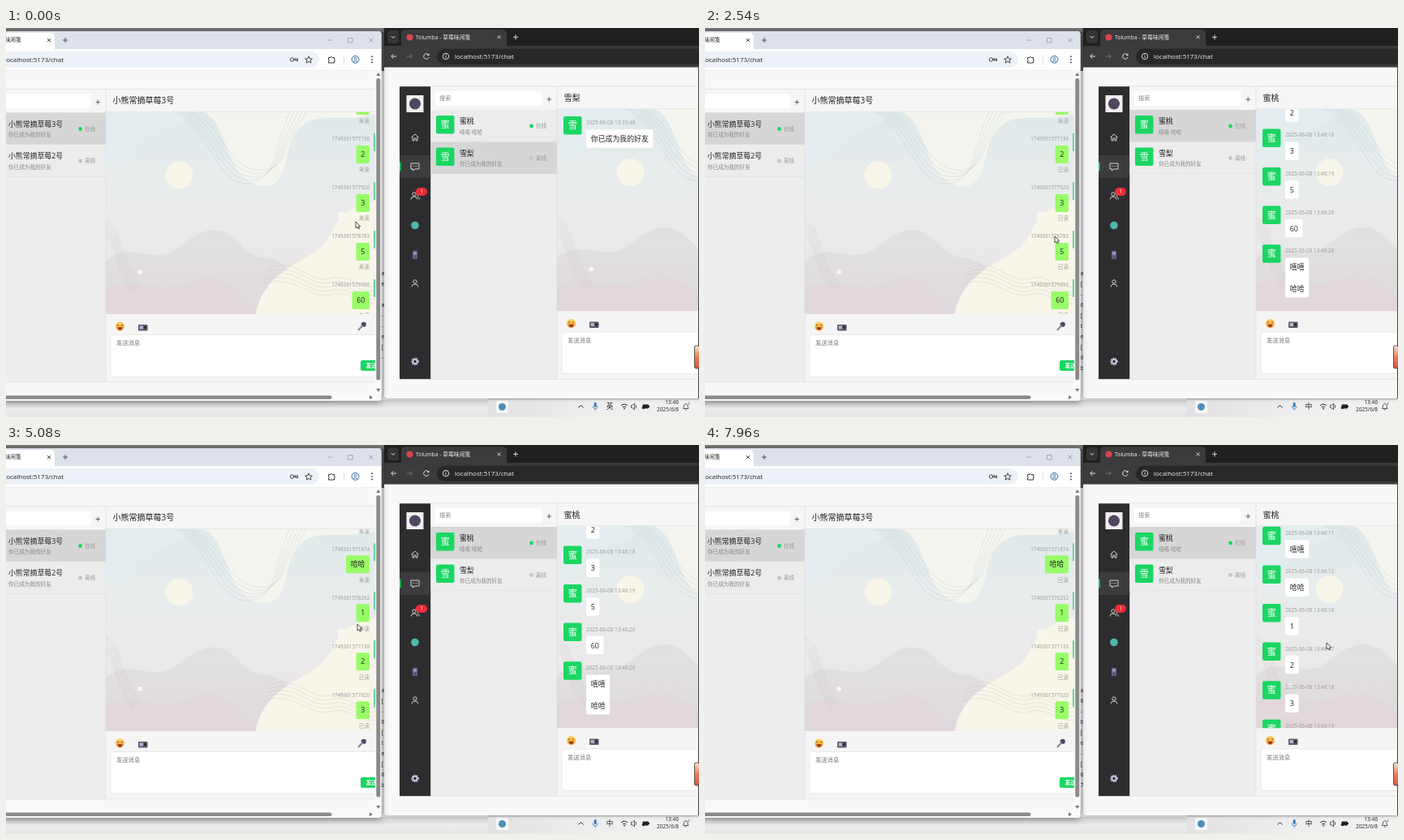
Recreate the animation shown at these times as an HTML page with a canvas. Size 854 px wide and 480 px high, loop 8 s.

```html
<!DOCTYPE html>
<html lang="zh">
<head>
<meta charset="utf-8">
<title>Chat</title>
<style>
html, body { margin: 0; width: 100%; height: 100%; overflow: hidden; background: #fff; }
canvas { display: block; width: 100vw; height: 100vh; }
</style>
</head>
<body>
<canvas id="stage"></canvas>
<script>
const W = 854, H = 480, LOOP = 8000;
const CLICK = 1480, NOTCH = 55.6;
const FONT = '"Open Sans", "Noto Sans CJK SC", "Noto Sans CJK", sans-serif';
const GREEN = '#1bd663', GRAY = '#999';
const canvas = document.getElementById('stage');
const c = canvas.getContext('2d');
const dpr = window.devicePixelRatio || 1;
canvas.width = W * dpr;
canvas.height = H * dpr;

// ---------- drawing helpers ----------
function rect(x, y, w, h, fill, r = 0, stroke) {
  c.beginPath();
  r ? c.roundRect(x, y, w, h, r) : c.rect(x, y, w, h);
  if (fill) { c.fillStyle = fill; c.fill(); }
  if (stroke) { c.strokeStyle = stroke; c.lineWidth = 0.8; c.stroke(); }
}
function disc(x, y, r, fill, stroke, width = 1) {
  c.beginPath();
  c.arc(x, y, r, 0, 7);
  if (fill) { c.fillStyle = fill; c.fill(); }
  if (stroke) { c.strokeStyle = stroke; c.lineWidth = width; c.stroke(); }
}
function path(d, fill, stroke, width = 1) {
  const p = new Path2D(d);
  if (fill) { c.fillStyle = fill; c.fill(p); }
  if (stroke) { c.strokeStyle = stroke; c.lineWidth = width; c.stroke(p); }
}
function text(s, x, y, size, color = '#222', align = 'left', weight = 400) {
  c.font = `${weight} ${size}px ${FONT}`;
  c.fillStyle = color;
  c.textAlign = align;
  c.fillText(s, x, y + size * 0.37);
}
function textWidth(s, size) {
  c.font = `400 ${size}px ${FONT}`;
  return c.measureText(s).width;
}
function fade(x0, y0, x1, y1, ...colors) {
  const g = c.createLinearGradient(x0, y0, x1, y1);
  colors.forEach((k, i) => g.addColorStop(i / (colors.length - 1), k));
  return g;
}
function at(x, y, draw) {
  c.save();
  c.translate(x, y);
  draw();
  c.restore();
}
function clipped(x, y, w, h, draw) {
  c.save();
  c.beginPath();
  c.rect(x, y, w, h);
  c.clip();
  draw();
  c.restore();
}

// ---------- motion ----------
const ease = p => p * p * (3 - 2 * p);
const ramp = (t, from, span) => ease(Math.min(1, Math.max(0, (t - from) / span)));
const scroll = (t, starts) => starts.reduce((sum, s) => sum + NOTCH * ramp(t, s, 170), 0);
const leftScroll = t => scroll(t, [3450, 4600]);
const rightScroll = t => scroll(t, [6693, 7180, 7600]);

// time, x, y, shape on arrival
const track = [
  [0, 431, 239, 'arrow'], [350, 431, 239, 'arrow'], [1000, 531, 164, 'hand'],
  [1350, 562, 127, 'hand'], [1700, 562, 127, 'hand'], [2350, 431, 257, 'beam'],
  [2750, 431, 257, 'beam'], [3250, 329, 233, 'arrow'], [4400, 329, 233, 'arrow'],
  [4950, 433, 221, 'arrow'], [5950, 433, 221, 'arrow'], [6550, 767, 244, 'arrow'],
  [7400, 767, 244, 'arrow'], [7800, 766, 244, 'arrow'], [LOOP, 766, 244, 'arrow']
];
function pointer(t) {
  const i = Math.max(1, track.findIndex(k => k[0] > t));
  const a = track[i - 1], b = track[i];
  const p = ramp(t, a[0], b[0] - a[0]);
  const x = a[1] + (b[1] - a[1]) * p, y = a[2] + (b[2] - a[2]) * p;
  let shape = p < 0.9 ? a[3] : b[3];
  if (shape === 'hand' && x < 523 || shape === 'beam' && p > 0 && p < 0.9) shape = 'arrow';
  if (x > 523 && x < 678) shape = 'hand';
  return { x, y, shape };
}
function drawPointer(t) {
  const { x, y, shape } = pointer(t);
  at(x, y, () => {
    if (shape === 'arrow') {
      path('M0 0V8L1.9 6.4L3.2 9L4.5 8.4L3.3 5.9H5.8Z', '#fff', '#222', 0.8);
    } else if (shape === 'hand') {
      path('M-.8 .2Q0-1 .9 .2V3.6L3.8 4.4Q4.8 4.8 4.6 6L4 9H-.8L-3 5.8Q-2.6 4.6-.8 5.8Z', '#fff', '#222', 0.8);
    } else {
      path('M-1.5-4H1.5M0-4V4M-1.5 4H1.5', null, '#333', 0.9);
    }
  });
}

// ---------- data ----------
const me = '小熊常摘草莓';
const contactsA = [
  { name: me + '3号', sub: '你已成为我的好友', on: true },
  { name: me + '2号', sub: '你已成为我的好友' }
];
const contactsB = [
  { name: '蜜桃', sub: '嘻嘻 哈哈', on: true },
  { name: '雪梨', sub: '你已成为我的好友' }
];
const sent = [
  ['1749361570961', '嘻嘻', '11'], ['1749361571874', '哈哈', '12'],
  ['1749361576292', '1', '16'], ['1749361577136', '2', '17'],
  ['1749361577920', '3', '18'], ['1749361578783', '5', '19'],
  ['1749361579996', '60', '20']
];

// ---------- chat wallpaper ----------
function wallpaper() {
  rect(123, 103.5, 340, 250, fade(0, 103, 0, 353, '#dfe9ea', '#e8ecec', '#ebe9e9', '#e5dfe2'));
  path('M123 103H232C210 128 180 126 160 150C148 164 136 166 123 170Z', '#e3edef');
  path('M123 288C150 262 176 290 204 276C226 262 238 246 262 250C286 254 290 282 322 284C352 288 368 318 372 353H123Z', 'rgba(211,208,211,.38)');
  path('M123 320C160 306 196 330 228 312C262 294 286 322 310 353H123Z', 'rgba(226,211,217,.45)');
  path('M240 103C262 108 268 140 279 164C290 192 325 207 338 184C350 162 344 132 370 117C392 104 420 118 462 104Z', '#f5f5ef');
  path('M308 353C312 326 330 306 356 291C386 274 394 268 402 250C412 228 432 216 462 212V353Z', '#f8f5e9');
  for (let i = 0; i < 5; i++) {
    const d = i * 5;
    path(`M${205 + d} 103C${236 + d} 112 ${248 + d} 152 ${268 + d} ${176 - d / 2}C${288 + d} ${202 - d} ${322 + d / 2} ${196 - d} ${331 + d / 2} 160C${336 + d / 2} 136 ${344 + d} 118 ${350 + d} 103`,
      null, 'rgba(160,178,190,.42)', 0.6);
    path(`M123 ${238 + d}C${144 - d / 3} ${246 + d} ${138 - d / 3} ${282 + d / 2} ${166 - d / 2} ${318 + d / 3}`,
      null, 'rgba(170,165,175,.4)', 0.6);
    path(`M${326 - d / 2} ${296 + d}C${356} ${282 + d} ${374} ${316 + d} ${400} ${309 + d}C${425} ${302 + d} ${435} ${326 + d} 460 ${318 + d}`,
      null, 'rgba(180,175,175,.4)', 0.6);
  }
  disc(213.5, 181.5, 17, '#f8f5e9');
  disc(414.5, 232.5, 6, '#faf7ee');
  disc(165, 301, 3, '#faf6f2');
}

// ---------- messages ----------
function avatar(ch, x, y) {
  rect(x, y, 22.5, 22.5, GREEN, 2);
  text(ch, x + 11.2, y + 11.2, 11, '#fff', 'center');
}
function outgoing(t) {
  const shift = leftScroll(t);
  sent.forEach(([stamp, body], i) => {
    const y = 137 + (i - 3) * 60 + shift;
    if (y < 50 || y > 370) return;
    const w = textWidth(body, 8.8) + 11.4;
    text(stamp, 448, y, 6.3, GRAY, 'right');
    rect(448 - w, y + 8, w, 22, '#98fb68', 2);
    text(body, 448 - w / 2, y + 19, 8.8, '#222', 'center');
    const seen = i > 0 && t > CLICK + 60 && 108 + (i - 3) * 47.6 + rightScroll(t - 60) > 102;
    text(seen ? '已读' : '未读', 448, y + 38, 6.6, GRAY, 'right');
    rect(453, y - 7, 2, 22, '#62d99a');
  });
}
function incoming(ch, stamp, y, lines) {
  const w = Math.max(...lines.map(s => textWidth(s, 8.9))) + 11.4;
  avatar(ch, 131, y - 7.7);
  text(stamp, 159, y, 6.4, GRAY);
  rect(159, y + 8.5, w, 22.5 + (lines.length - 1) * 26.5, '#fff', 2);
  lines.forEach((s, i) => text(s, 164.8, y + 20 + i * 26.5, 8.9));
}
function inbox(t) {
  if (t < CLICK) {
    incoming('雪', '2025-06-08 13:39:46', 120.3, ['你已成为我的好友']);
    return;
  }
  const shift = rightScroll(t);
  sent.forEach(([, body, sec], i) =>
    incoming('蜜', '2025-06-08 13:46:' + sec, 135.6 + (i - 4) * 47.6 + shift, [body]));
  incoming('蜜', '2025-06-08 13:46:26', 278.4 + shift, ['嘻嘻', '哈哈']);
}

// ---------- chat application, shared by both windows ----------
function sidebar() {
  rect(-71, 75.5, 38.5, 361.5, '#2d2d2f');
  rect(-62.5, 86.5, 21, 21, '#f1eef2');
  disc(-52, 97, 7, '#514760');
  rect(-71, 160.5, 38.5, 28, '#3c3c3e');
  rect(-71, 169, 1.6, 11, GREEN);
  const ink = '#e0e0e0';
  at(-52, 138.5, () => path('M-4.5 0L0-4L4.5 0M-3-1V4H-1V1H1V4H3V-1', null, ink, 0.9));
  at(-52, 174.5, () => {
    path('M-5-4H5V3H0L-2.5 5V3H-5Z', null, ink, 0.9);
    [-2.3, 0, 2.3].forEach(x => disc(x, -0.5, 0.6, ink));
  });
  const person = (x, y) => at(x, y, () => {
    disc(0, -2, 2.2, null, ink, 0.9);
    path('M-4 4.5Q-3.6 1 0 1T4 4.5', null, ink, 0.9);
  });
  person(-53, 210.5);
  path('M-50 206Q-47 208-49 211Q-47 212-46.5 215', null, ink, 0.9);
  rect(-51, 200.5, 14, 10, '#ef2d35', 5);
  text('1', -44, 205.5, 6.5, '#fff', 'center');
  disc(-52, 247, 4.8, '#4fb8ad');
  rect(-55, 278.5, 6, 10, '#71608e', 1);
  rect(-53.7, 280, 3.4, 3, '#a69abd');
  [284.5, 286.5].forEach(y => rect(-53.5, y, 3, 0.8, '#3d3350'));
  person(-52, 318.5);
  c.setLineDash([1.6, 1.25]);
  disc(-52, 415, 4, null, '#d4c6e5', 1.6);
  c.setLineDash([]);
  disc(-52, 415, 2.6, null, '#d4c6e5', 1.7);
}
function contactList(contacts, selected) {
  rect(-32.5, 75.5, 155.5, 361.5, '#ededed');
  rect(-32.5, 75.5, 155.5, 29, '#f6f6f6');
  rect(-27, 81.5, 131.5, 18, '#fff', 2);
  text('搜索', -22, 90, 7.3, '#888');
  path('M110.5 91.5H116M113.2 88.7V94.3', null, '#444', 0.8);
  contacts.forEach((p, i) => {
    const y = 104.5 + i * 39.5;
    rect(-32.5, y, 155.5, 39.5, i === selected ? '#d6d6d6' : '#ececec');
    rect(-32.5, y + 39, 155.5, 0.6, '#dcdcdc');
    avatar(p.name[0], -26, y + 7);
    text(p.name, 3, y + 14, 8.9);
    text(p.sub, 3, y + 27.5, 6.6, '#888');
    disc(91.5, y + 20, 2.4, p.on ? GREEN : '#c4c4c4');
    text(p.on ? '在线' : '离线', 97, y + 20, 6.6, GRAY);
  });
}
function composer() {
  rect(123, 353, 340, 84, '#f5f5f5');
  disc(140.5, 368, 5.5, fade(0, 362, 0, 374, '#ffd65a', '#f49a38'));
  path('M137 367Q138 365.5 139 367M142 367Q143 365.5 144 367', null, '#6b3b19', 0.9);
  path('M137.4 369.2H143.6Q142.6 372.6 140.5 372.6T137.4 369.2Z', '#8f3424');
  rect(163, 366, 11.5, 7.5, '#5c566c', 1);
  rect(164.5, 367.5, 4.5, 4, '#b7b1c5');
  disc(171.5, 369.5, 1.8, '#2f2a3a');
  path('M434 373L439 367.5', null, '#8a8494', 2);
  disc(440.8, 365.8, 3.1, '#524565');
  path('M437.5 366L440.5 369', null, '#bdb4cc', 1);
  rect(129, 378.5, 340, 51.5, '#fff', 3, '#e6e6e6');
  text('发送消息', 136, 388.5, 7.3, '#777');
  rect(437, 410, 30, 13, GREEN, 2.5);
  text('发送', 443.5, 416.5, 6.8, '#fff', 'left', 700);
}
function chatApp(contacts, selected, drawMessages) {
  sidebar();
  contactList(contacts, selected);
  rect(123, 75.5, 340, 28, '#f6f6f6');
  text(contacts[selected].name, 131.5, 89.5, 10);
  clipped(123, 103.5, 340, 249.5, () => {
    wallpaper();
    drawMessages();
  });
  composer();
  rect(122.6, 75.5, 0.7, 361.5, '#dcdcdc');
  rect(-71, 75, 540, 0.7, '#e0e0e0');
  rect(-71, 436.5, 540, 0.7, '#e2e2e2');
  rect(123, 103, 340, 0.6, '#dedede');
}

// ---------- windows ----------
const cross = (x, y, r, color) =>
  path(`M${x - r} ${y - r}L${x + r} ${y + r}M${x + r} ${y - r}L${x - r} ${y + r}`, null, color, 0.9);
const plus = (x, y, color) =>
  path(`M${x - 3} ${y}H${x + 3}M${x} ${y - 3}V${y + 3}`, null, color, 0.9);

function leftWindow(t) {
  c.save();
  c.shadowColor = 'rgba(0,0,0,.4)';
  c.shadowBlur = 8 * dpr;
  c.shadowOffsetY = 2 * dpr;
  rect(-10, 4, 472.5, 456, '#f8f8f8', 4);
  c.restore();
  rect(-10, 4, 472.5, 26, '#dde1ea', [4, 4, 0, 0]);
  rect(-20, 6, 80, 24, '#fff', [5, 5, 0, 0]);
  text('味闲笺', 18.5, 15, 6.6, '#222', 'right');
  cross(53, 15, 2, '#333');
  plus(73, 15, '#444');
  path('M396.5 15H402M421.5 12.5H427V18H421.5Z', null, '#999', 0.8);
  cross(450, 15, 2.6, '#999');
  rect(0, 26, 462.5, 26, '#fff');
  rect(-20, 29, 406, 19.5, '#edf1f8', 10);
  text('localhost:5173/chat', 71, 38.7, 8, '#222', 'right');
  disc(352.5, 39, 2.2, null, '#444', 1);
  path('M354.7 38H359.5V40.5H358V39.5H355', null, '#444', 1);
  path('M373 34.8L374.3 37.8L377.4 38L375 40L375.8 43.1L373 41.4L370.2 43.1L371 40L368.6 38L371.7 37.8Z', null, '#333', 0.9);
  path('M397.5 36.5H400Q400.5 34 402 36.5H404.5V39Q406.5 40 404.5 41V43H397.5V41Q399.5 40 397.5 39Z', null, '#333', 1);
  rect(416, 34, 0.8, 10, '#d5dcea');
  disc(430.5, 38.8, 4.4, null, '#2d629f', 1);
  disc(430.5, 37.6, 1.4, null, '#2d629f', 0.9);
  path('M427.7 41.5Q430.5 39.2 433.3 41.5', null, '#2d629f', 0.9);
  [35.2, 38.8, 42.4].forEach(y => disc(451, y, 0.9, '#333'));
  rect(0, 52, 462.5, 0.6, '#e6e6e6');
  clipped(0, 52.6, 455, 399, () => chatApp(contactsA, 0, () => outgoing(t)));
  rect(455, 52.6, 7.5, 399, '#fafafa');
  rect(456.3, 62, 5, 372.5, '#8a8a8a', 2.5);
  path('M456.3 59L458.8 55L461.3 59ZM456.3 445L458.8 449L461.3 445Z', '#777');
  rect(0, 451.5, 462, 8, '#fafafa');
  rect(-5, 453.5, 406.5, 4.6, '#8a8a8a', 2.3);
  path('M448 453.3L452 455.8L448 458.3Z', '#777');
}

function rightWindow(t) {
  c.save();
  c.shadowColor = 'rgba(0,0,0,.35)';
  c.shadowBlur = 5 * dpr;
  rect(466, -5, 400, 462, '#f8f8f8', 4);
  c.restore();
  rect(466, 0, 388, 24, '#202020');
  rect(470, 3, 14, 16, '#353535', 4);
  path('M474.8 10L477 12.3L479.2 10', null, '#ddd', 1);
  rect(487, 2, 130, 24, '#3b3b3b', [5, 5, 0, 0]);
  disc(497.5, 11.5, 4, '#d9444f');
  text('Tolumba - 草莓味闲笺', 505, 11.3, 6.8, '#f0f0f0');
  cross(607.5, 11.3, 2, '#eee');
  plus(628, 11.3, '#eee');
  rect(466, 22, 388, 26.5, '#3b3b3b');
  rect(531, 25.5, 340, 19.5, '#282828', 10);
  path('M481 35H475M477.5 32.2L474.7 35L477.5 37.8', null, '#e4e4e4', 1);
  path('M494 35H500M497.7 32.2L500.5 35L497.7 37.8', null, '#777', 1);
  c.beginPath();
  c.arc(518, 35, 3.2, 0.3, 5.6);
  c.strokeStyle = '#e4e4e4';
  c.lineWidth = 1;
  c.stroke();
  path('M521.5 31.2V34H518.8Z', '#e4e4e4');
  disc(542, 35, 3.7, null, '#eee', 0.9);
  path('M542 34.5V37M542 32.7V33.6', null, '#eee', 0.9);
  text('localhost:5173/chat', 553, 35.2, 8, '#f2f2f2');
  clipped(467, 48.5, 386, 408, () =>
    at(556, -3.5, () => chatApp(contactsB, t < CLICK ? 1 : 0, () => inbox(t))));
  rect(853, 48, 1, 409, '#444');
  rect(848.5, 392, 6, 28, fade(0, 392, 0, 420, '#f7e5d6', '#ec8152', '#d95545'), 2, '#333');
}

function desktop(t) {
  rect(0, 0, W, H, '#e9e9ea');
  rect(0, 0, 466, 5, '#777');
  rect(462, 5, 5, 48, '#555');
  rect(462, 53, 5, 406, '#eee');
  rect(0, 459, 595, 21, fade(0, 459, 0, 480, '#cfcfd0', '#ececec', '#e4e4e4'));
  const log = t < CLICK ? 'ae a--e[-' : t < 7200 ? 'a[-6[te[6b' : 'a6-b[e-[67';
  clipped(462.5, 295, 3.5, 135, () =>
    [...log].forEach((ch, i) => text(ch, 462.5, 302 + i * 13, 7, '#222')));
}

function taskbar(t) {
  rect(594, 457, 260, 23, fade(594, 0, 854, 0, '#e2e2e4', '#eeeeef', '#f1f1f1'));
  rect(594, 457, 260, 1.5, 'rgba(0,0,0,.12)');
  rect(604, 460, 15, 15, '#f7f7f8', 2);
  disc(611.5, 467.5, 4.5, '#4b8fb8');
  path('M705.5 468.5L708.5 465.5L711.5 468.5', null, '#222', 1);
  rect(724.7, 462, 3, 6, '#3978b8', 1.5);
  path('M723 466.5Q723.5 470 726.2 470T729.5 466.5M726.2 470V472', null, '#3978b8', 0.8);
  text(t < CLICK ? '英' : '中', 744, 467, 8.6, '#222', 'center');
  path('M758 465.8Q762 462.5 766 465.8M759.8 468Q762 466.2 764.2 468', null, '#333', 1);
  disc(762, 469.7, 0.9, '#333');
  path('M770.5 465.5H772L774.5 463V471L772 468.7H770.5Z', null, '#333', 0.8);
  path('M776 465Q777.5 467 776 469', null, '#333', 0.8);
  rect(784.5, 464.5, 7.5, 5, '#222', 1);
  rect(792, 466, 1, 2, '#222');
  disc(785.5, 468.5, 1.8, '#222');
  text('13:46', 829, 462, 6.5, '#222', 'right');
  text('2025/6/8', 829, 471, 6.5, '#222', 'right');
  path('M834.5 469.5Q835.5 468 835.5 465.5Q837.8 461.5 840 465.5Q840 468 841 469.5ZM836.8 471H838.8', null, '#333', 0.8);
  text('z', 840.5, 463.5, 4.5, '#333');
}

function draw(now) {
  const t = now % LOOP;
  c.setTransform(dpr, 0, 0, dpr, 0, 0);
  desktop(t);
  taskbar(t);
  rightWindow(t);
  leftWindow(t);
  drawPointer(t);
  requestAnimationFrame(draw);
}
requestAnimationFrame(draw);
</script>
</body>
</html>
```
